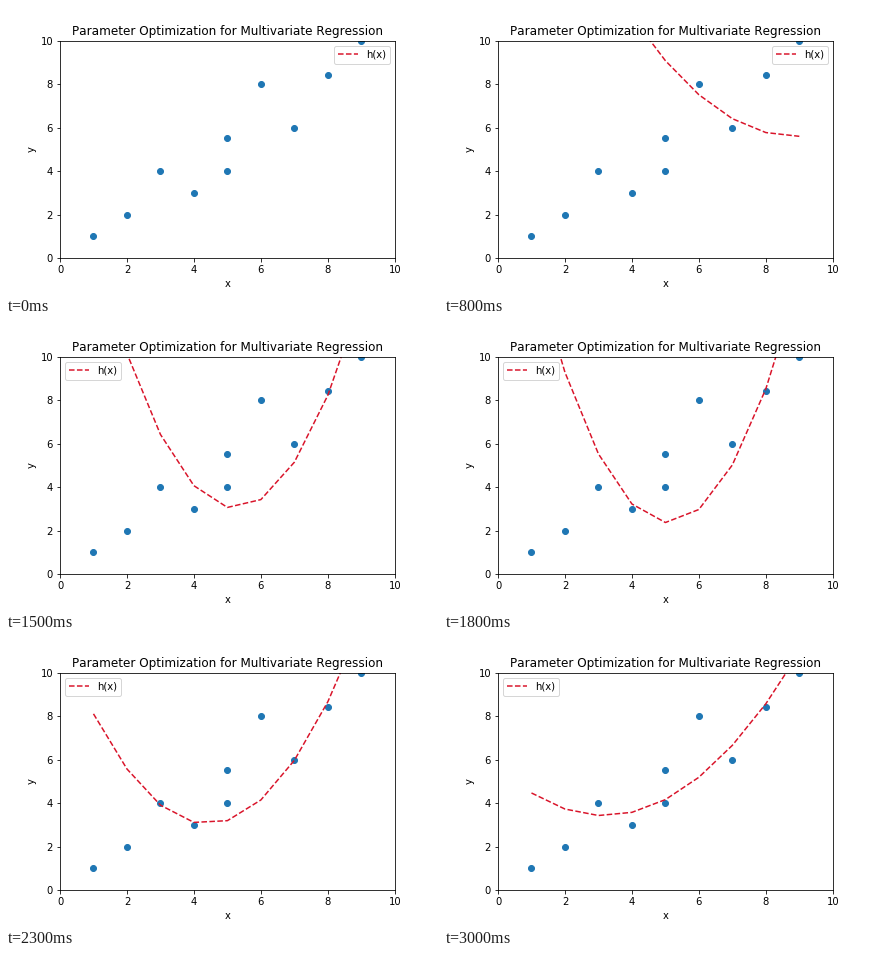
Animation of 432x288 px, one loop 3.5 s. Source, as a matplotlib script:

```python
import numpy as np
import matplotlib.pyplot as plt
from matplotlib.animation import FuncAnimation

plt.rcParams["text.kerning_factor"] = 6  # whole-pixel letter spacing

STEPS, HOLD, INTERVAL = 31, 4, 100

X = np.array([1, 2, 3, 4, 5, 5, 6, 7, 8, 9])
Y = np.array([1, 2, 4, 3, 5.5, 4, 8, 6, 8.4, 10])

# Gradient descent on a quadratic, solved along the eigenvectors of its Hessian
FEATURES = np.vander(X, 3, increasing=True).astype(float)
RATES, MODES = np.linalg.eigh(FEATURES.T @ FEATURES)
BEST = np.linalg.lstsq(FEATURES, Y, rcond=None)[0]
START = np.array([34.81, 20.84, 16.84])
OFFSET = MODES.T @ (START - BEST)


def descent_time(step):
    """Small even steps at first, then larger strides."""
    return np.interp(step, [0, 18, 21, 25, 30], [0, 0.18, 0.59, 2.0, 2.65])


def hypothesis(step):
    decay = np.exp(-RATES * descent_time(step))
    return FEATURES @ (BEST + MODES @ (OFFSET * decay))


fig, ax = plt.subplots(figsize=(6, 4), dpi=72, facecolor="white")
fig.subplots_adjust(left=0.125, bottom=0.125, right=0.9, top=0.88)

ax.scatter(X, Y)
curve, = ax.plot(X, hypothesis(0), "--", color="#d9142a", label="h(x)")
ax.set(xlim=(0, 10), ylim=(0, 10), xlabel="x", ylabel="y",
       xticks=range(0, 11, 2), yticks=range(0, 11, 2),
       title="Parameter Optimization for Multivariate Regression")
ax.legend(loc="best")  # moves to whichever corner the curve leaves free


def update(i):
    curve.set_ydata(hypothesis(min(i, STEPS - 1)))
    return curve,


anim = FuncAnimation(fig, update, frames=STEPS + HOLD, interval=INTERVAL,
                     repeat=True, repeat_delay=0)
plt.show()
```
